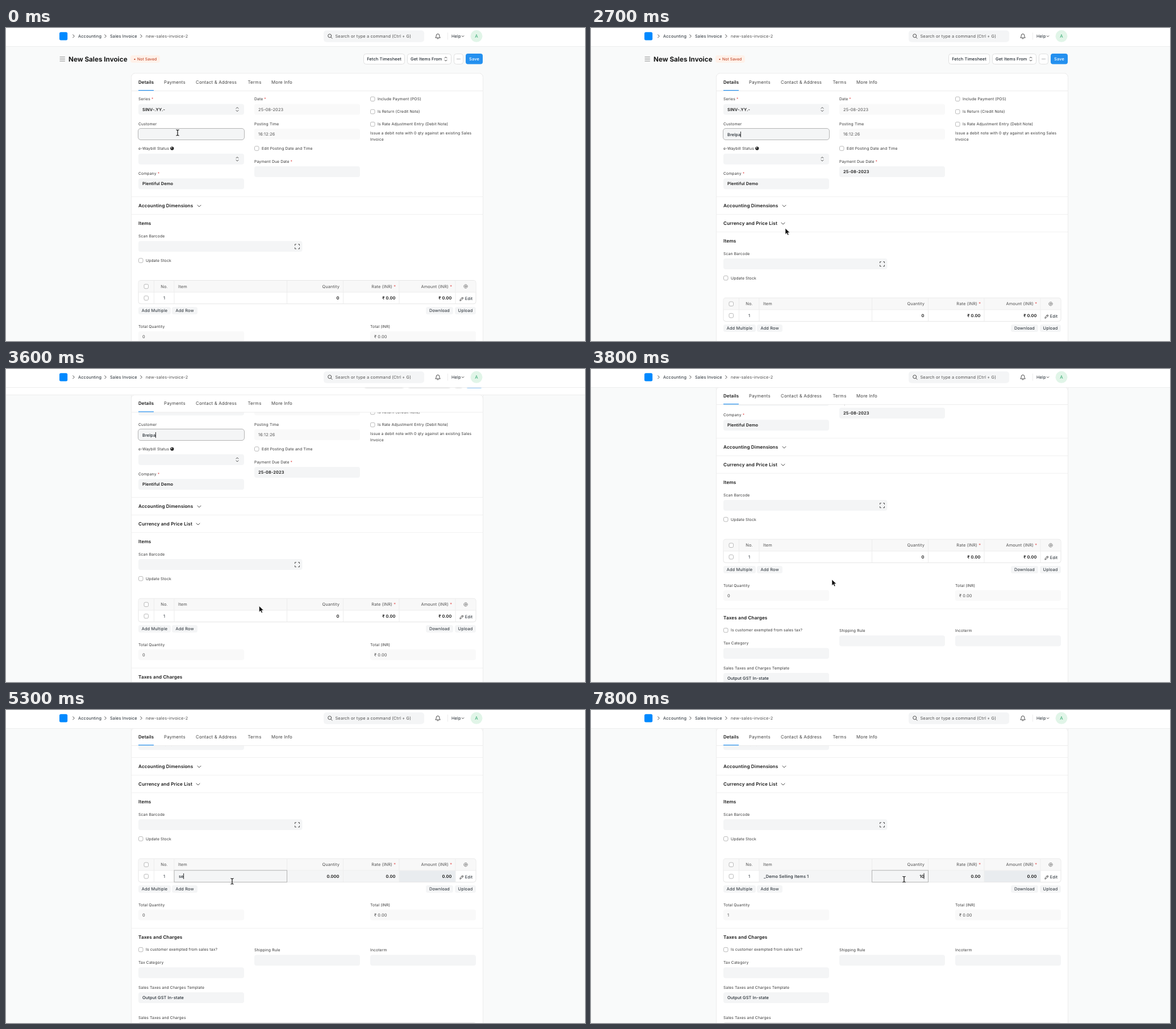
Write an HTML page that moves like this. It is 1019 px wide and 550 px high and loops after 8000 ms.

```html
<!DOCTYPE html>
<html lang="en">
<head>
<meta charset="utf-8">
<title>New Sales Invoice</title>
<style>
  html, body { margin: 0; width: 100%; height: 100%; overflow: hidden; background: #f9fafa; }
  svg { display: block; width: 1019px; height: 550px; }
  text { font: 400 7.37px Inter, sans-serif; letter-spacing: .02em; fill: #1f272e; text-rendering: geometricPrecision; white-space: pre; }
  .small { font-size: 6.78px; fill: #383838; }
  .tab { font-size: 7.87px; fill: #454545; }
  .section { font-size: 8.1px; font-weight: 600; fill: #171717; }
  .title { font-size: 11.7px; font-weight: 700; letter-spacing: 0; fill: #171717; }
  .bold { font-weight: 600; fill: #171717; }
  .medium { font-weight: 500; }
  .muted { fill: #525252; }
  .warn { fill: #b52a09; }
  .light { fill: #fff; }
  .end { text-anchor: end; }
  .mid { text-anchor: middle; }
  .icon { fill: none; stroke: #383838; stroke-width: .9; stroke-linecap: round; stroke-linejoin: round; }
  .soft { stroke: #777; }
  .rule { stroke: #ededed; fill: none; }
  .section-rule { stroke: #f1f1f1; fill: none; }
  .focus { fill: #f4f5f6; stroke: #b4b4b4; }
  .caret { stroke: #111; stroke-width: .9; }
  .panel { fill: #fff; filter: drop-shadow(0 1px 2px #0003); }
</style>
</head>
<body>
<svg id="stage" viewBox="0 0 1019 550" xmlns="http://www.w3.org/2000/svg"></svg>
<script>
const LOOP = 8000;
const COLS = [233, 437, 641];
const INSERT = 30.75; // height of the currency section

const text = (x, y, s, cls = '', id = '') =>
  `<text x="${x}" y="${y}" dy=".36em" class="${cls}" id="${id}">${s}</text>`;
const rect = (x, y, w, h, fill, rx = 0, extra = '') =>
  `<rect x="${x}" y="${y}" width="${w}" height="${h}" rx="${rx}" fill="${fill}" ${extra}/>`;
const path = (d, cls = 'icon', extra = '') => `<path d="${d}" class="${cls}" ${extra}/>`;
const group = (id, ...parts) => `<g id="${id}">${parts.join('')}</g>`;
const star = s => `${s} <tspan fill="#e24c4c">*</tspan>`;
const label = (x, y, s) => text(x, y, s, 'small');
const field = (x, y, s = '', cls = 'bold', w = 186, id = '') =>
  rect(x, y - 9.5, w, 19, cls.includes('muted') ? '#f9f9f9' : '#f4f5f6', 4) + text(x + 7, y, s, cls, id);
const box = (x, y) => rect(x + .5, y - 3.7, 7.5, 7.5, '#fff', 2, 'stroke="#a9a9a9" stroke-width=".8"');
const check = (x, y, s) => box(x, y) + text(x + 13, y, s, 'small');
const updown = (x, y) => path(`M${x - 2} ${y - 1.6}l2-2 2 2m-4 3.2l2 2 2-2`);
const down = (x, y, r = 3) => path(`M${x - r} ${y - r / 2}l${r} ${r} ${r}-${r}`);
const right = (x, y) => path(`M${x - 1.3} ${y - 2.6}l2.6 2.6-2.6 2.6`);
const rule = y => path(`M221 ${y}H839`, 'section-rule');
const chip = (x, y, w, s) => rect(x, y - 6.5, w, 13, '#f4f5f6', 3.5) + text(x + w / 2, y, s, 'mid');
const button = (x, w, s) =>
  rect(x + .5, 45.5, w - 1, 18, '#fff', 4, 'stroke="#e0e0e0"') + text(x + w / 2, 54.5, s, 'mid medium');

const nav = () => group('nav',
  rect(0, 0, 1019, 32, '#fff'), path('M0 32.5H1019', 'rule'),
  rect(94, 7.3, 14.2, 14.2, '#0089ff', 2.5),
  [119, 175, 238].map(x => right(x, 14.3)).join(''),
  text(127, 14.3, 'Accounting'), text(183, 14.3, 'Sales Invoice'), text(246, 14.3, 'new-sales-invoice-2', 'muted'),
  rect(559, 4.3, 177, 20.4, '#f4f5f6', 5),
  path('M572 16.3l2 2M572.7 13.7a3 3 0 1 1-6 0 3 3 0 0 1 6 0'),
  text(579.5, 14.5, 'Search or type a command (Ctrl + G)', 'muted'),
  path('M756 16.8c1.2-1 1.2-2.4 1.2-3.6a2.8 2.8 0 0 1 5.6 0c0 1.2 0 2.6 1.2 3.6zM759 18.5a1.1 1.1 0 0 0 2 0'),
  path('M777.5 8V20.5', 'rule'), text(784, 14.3, 'Help'), down(804, 14.5, 1.8),
  '<circle cx="828" cy="14.3" r="10.5" fill="#e1f5e8"/>',
  text(828, 14.3, '<tspan fill="#30a66d">A</tspan>', 'mid tab'));

const head = () => group('head',
  group('headFill', rect(0, 0, 1019, 76, '#fff'), path('M0 75.5H1019', 'rule')),
  path('M95 51h8.5m-8.5 3.5h8.5m-8.5 3.5h8.5', 'icon soft'),
  text(110, 54.5, 'New Sales Invoice', 'title'),
  rect(219, 48, 52, 13, '#fff1e9', 4), '<circle cx="226.5" cy="55" r="1.1" class="warn"/>',
  text(231, 55, '<tspan class="warn">Not Saved</tspan>', 'small'),
  button(629, 73, 'Fetch Timesheet'), button(706, 78, ''),
  text(712, 54.5, 'Get Items From', 'medium'), updown(774, 54.5), button(788, 17, '···'),
  rect(809, 45, 30, 18.5, '#2490ef', 4), text(824, 54.5, 'Save', 'mid medium light'));

const strip = () => group('strip',
  '<path d="M220.5 110.5V86.5a7 7 0 0 1 7-7H832.5a7 7 0 0 1 7 7V110.5z" fill="#fff" stroke="#ededed"/>',
  text(233, 95, 'Details', 'tab bold'), text(278, 95, 'Payments', 'tab'),
  text(334, 95, 'Contact &amp; Address', 'tab'), text(425.5, 95, 'Terms', 'tab'), text(467, 95, 'More Info', 'tab'),
  rect(233, 109, 27, 1.2, '#2490ef'));

const upper = () => {
  const [a, b, c] = COLS;
  return [
    label(a, 125, star('Series')), field(a, 143, 'SINV-.YY.-'), updown(407, 143),
    label(a, 168.7, 'Customer'),
    rect(232.5, 176.5, 187, 20, '', 4.5, 'class="focus"'), text(240, 187, '', 'medium', 'customer'),
    path('', 'caret', 'id="customerCaret"'),
    label(a, 212, 'e-Waybill Status'),
    '<circle cx="292.3" cy="211.5" r="3.1" fill="#222"/>',
    path('M290.5 210.3l1.5-.8.5 1.3-1 1.2zM293.5 212.5l1-.7', 'light'),
    field(a, 230.3), updown(407, 230.3),
    label(a, 256, star('Company')), field(a, 273.8, 'Plentiful Demo'),
    label(b, 125, star('Date')), field(b, 143, '25-08-2023', 'muted'),
    label(b, 168.7, 'Posting Time'), field(b, 186.5, '16:12:26', 'muted'),
    check(b, 211.5, 'Edit Posting Date and Time'),
    label(b, 234.5, star('Payment Due Date')), field(b, 252.5, '', 'bold', 186, 'due'),
    check(c, 124.7, 'Include Payment (POS)'), check(c, 147, 'Is Return (Credit Note)'),
    check(c, 169, 'Is Rate Adjustment Entry (Debit Note)'),
    label(c, 184.5, 'Issue a debit note with 0 qty against an existing Sales'), label(c, 196, 'Invoice'),
    rule(296.5), text(a, 312.3, 'Accounting Dimensions', 'section'), down(340, 312.7),
    group('currency', rule(327.5), text(a, 343, 'Currency and Price List', 'section'), down(338, 343.5))
  ].join('');
};

const table = () => [
  rect(233, 443.5, 594, 41.2, '#fff', 4, 'stroke="#e6e6e6"'),
  rect(233.5, 444, 593, 20, '#f8f8f8', 3),
  group('editCells', rect(296, 464.5, 396, 20, '#f4f5f6'), rect(692, 464.5, 99, 20, '#e9ecef')),
  path('M233 464.2H827' + [260.5, 296, 494.5, 593.5, 692, 791].map(x => `M${x} 443.5v41.2`).join(''), 'rule'),
  rect(296, 464, 198.5, 20.7, '', 0, 'class="focus" id="itemFocus"'),
  rect(494.5, 464, 99, 20.7, '', 0, 'class="focus" id="qtyFocus"'),
  box(242.5, 454), box(242.5, 474.5),
  text(278.5, 454, 'No.', 'mid muted'), text(303, 454, 'Item', 'muted'), text(587, 454, 'Quantity', 'end muted'),
  text(686, 454, star('Rate (INR)'), 'end muted'), text(785, 454, star('Amount (INR)'), 'end muted'),
  '<g class="icon soft"><circle cx="809" cy="454" r="3.2" stroke-dasharray="1.6 .9"/><circle cx="809" cy="454" r="1.3"/></g>',
  text(278.5, 474.3, '1', 'mid'), text(304, 474.3, '', 'medium', 'item'), path('', 'caret', 'id="itemCaret"'),
  text(586.5, 474.3, '', 'end bold', 'qty'), path('M586 469v10', 'caret', 'id="qtyCaret"'),
  text(685.5, 474.3, '', 'end bold', 'rate'), text(784.5, 474.3, '', 'end bold', 'amount'),
  path('M799 479l.5-2 4-4 1.5 1.5-4 4zM802.3 474.2l1.5 1.5'), text(807.7, 475.8, 'Edit'),
  chip(233, 496.7, 57, 'Add Multiple'), chip(292, 496.7, 45, 'Add Row'),
  chip(739, 496.7, 48, 'Download'), chip(790, 496.7, 37, 'Upload')
].join('');

const lower = () => {
  const [a, b, c] = COLS;
  return group('lower',
    rule(327.5), text(a, 343, 'Items', 'section'),
    label(a, 365.5, 'Scan Barcode'), field(a, 383.7, '', '', 288.5),
    path('M508.5 382v-2h2m4 0h2v2m0 4v2h-2m-4 0h-2v-2'),
    check(a, 408.5, 'Update Stock'), table(),
    label(a, 524.5, 'Total Quantity'), field(a, 542.2, '', 'muted', 186, 'totalQty'),
    label(c, 524.5, 'Total (INR)'), field(c, 542.2, '₹ 0.00', 'muted'),
    rule(565.7), text(a, 581.3, 'Taxes and Charges', 'section'),
    check(a, 603.3, 'Is customer exempted from sales tax?'),
    label(a, 625.7, 'Tax Category'), field(a, 644),
    label(a, 669.5, 'Sales Taxes and Charges Template'), field(a, 687.7, 'Output GST In-state', 'medium'),
    label(a, 723.3, 'Sales Taxes and Charges'), rect(233, 731.5, 594, 30, '#f8f8f8', 4, 'stroke="#e6e6e6"'),
    label(b, 603.7, 'Shipping Rule'), field(b, 622), label(c, 603.7, 'Incoterm'), field(c, 622));
};

const option = (x, y, name, ...lines) =>
  text(x, y, name, 'bold') + lines.map((s, i) => text(x, y + 11.8 * (i + 1), s)).join('');

const customerList = () => group('customerList',
  '<clipPath id="listClip"><rect x="233" y="197" width="185" height="177"/></clipPath>',
  rect(233, 197.2, 182.5, 177, '', 3, 'class="panel"'),
  '<g clip-path="url(#listClip)">', rect(236.5, 200.5, 175, 46.5, '#f0f0f0', 4),
  option(242, 211.7, '_Demo Subscribed Customer', '_Demo Subscribed Customer, All Customer', 'Groups, All Territories'),
  option(242, 261.2, '_Demo Subscribed Instalment Customer', '_Demo Subscribed Instalment Customer, All', 'Customer Groups, All Territories'),
  option(242, 310.7, '_Demo Outland Customer', '_Demo Outland Customer, All Customer Groups,', 'All Territories'),
  option(242, 360.2, 'Demo', 'Demo, All Customer Groups, All Territories'),
  rect(415, 197, 3, 58, '#c1c1c1'), '</g>');

const itemList = () => group('itemList',
  rect(296.5, 303, 197, 178, '', 3, 'class="panel"'), rect(300, 306, 190, 34, '#f0f0f0', 4),
  [1, 2, 3].map(n => option(306, 317 + 37 * (n - 1), `_Demo Selling Items ${n}`, `_Demo Selling Items ${n}, Products`)).join(''));

const pointers =
  path('M0 0V10.5L2.5 8.3 4.2 12 6 11.2 4.4 7.6H7.8Z', '', 'id="arrow" fill="#111" stroke="#fff" stroke-width=".5"') +
  path('M-2.7-5Q-.5-5 0-4 .5-5 2.7-5M0-4V4M-2.7 5Q-.5 5 0 4 .5 5 2.7 5', '', 'id="beam" fill="none" stroke="#111" stroke-width="1.2"');

document.getElementById('stage').innerHTML =
  rect(0, 0, 1019, 550, '#f9fafa') +
  group('content', rect(220.5, 79.5, 619, 900, '#fff', 7, 'stroke="#ededed"'), upper(), lower()) +
  strip() + head() + nav() + customerList() + itemList() + pointers;

// Each track holds [start, value] steps.
const tracks = {
  scroll: [[0, 0], [3500, 18], [3600, 71], [3700, 130], [3800, 175], [3900, 204], [4000, 213]],
  lift: [[0, 0], [3500, 12], [3600, 30], [3700, 40], [3800, 43.5]],
  customer: [[0, ''], [1200, 'b'], [1300, 'br'], [1500, 'bre'], [2400, 'Brelpa']],
  item: [[0, ''], [5200, 's'], [5300, 'se'], [5400, 'sel'], [5500, 'sell'], [6400, '_Demo Selling Items 1']],
  qty: [[0, '0'], [4900, '0.000'], [6600, '1.000'], [7100, ''], [7600, '1'], [7800, '10']],
  totalQty: [[0, '0'], [6600, '1']],
  price: [[0, '₹ 0.00'], [4900, '0.00']],
  due: [[0, ''], [2700, '25-08-2023']],
  pointer: [
    [0, ['beam', 302, 184]], [1400, ['beam', 304, 187]], [1500, ['beam', 305, 188]],
    [1800, ['beam', 305, 195]], [1900, ['arrow', 311, 235]], [2000, ['arrow', 325, 290]],
    [2100, ['arrow', 337, 335]], [2200, ['arrow', 342, 352]],
    [2800, ['arrow', 352, 366]], [2900, ['arrow', 372, 382]], [3000, ['arrow', 396, 400]],
    [3100, ['arrow', 420, 412]], [3200, ['arrow', 438, 418]], [3300, ['arrow', 445.5, 416.5]],
    [3700, ['arrow', 440, 400]], [3800, ['arrow', 424, 370]], [3900, ['arrow', 408, 345]],
    [4000, ['arrow', 400, 331]], [4100, ['arrow', 394, 302]], [4300, ['arrow', 393, 274]],
    [4400, ['arrow', 394, 302]], [4700, ['beam', 398, 301]],
    [5400, ['beam', 398, 308]], [5600, ['arrow', 394, 318]], [5700, ['arrow', 394, 324]],
    [5900, ['arrow', 402, 324]], [6100, ['arrow', 411.5, 322]], [6500, ['arrow', 440, 316]],
    [6600, ['arrow', 490, 306]], [6700, ['arrow', 535, 297]], [6800, ['beam', 551, 297.5]]
  ]
};

const el = id => document.getElementById(id);
const at = (name, t) => tracks[name].findLast(([start]) => start <= t)[1];
const show = (id, on) => { el(id).style.display = on ? '' : 'none'; };
const move = (id, x, y) => el(id).setAttribute('transform', `translate(${x} ${y})`);
const write = (id, s) => { if (el(id).textContent !== s) el(id).textContent = s; };

function placeCaret(id, x, y) {
  const end = x + (el(id).textContent ? el(id).getComputedTextLength() : 0);
  el(id + 'Caret').setAttribute('d', `M${end} ${y - 5}v10`);
}

function draw(t) {
  const scroll = at('scroll', t), lift = at('lift', t);
  move('content', 0, -scroll);
  move('lower', 0, t >= 2700 ? INSERT : 0);
  move('head', 0, -lift);
  move('strip', 0, Math.max(-scroll, scroll ? -4.5 - lift : 0));
  show('headFill', scroll > 0);
  show('currency', t >= 2700);

  for (const id of ['customer', 'item', 'qty', 'totalQty', 'due']) write(id, at(id, t));
  write('rate', at('price', t));
  write('amount', at('price', t));
  placeCaret('customer', 240, 187);
  placeCaret('item', 304, 474.3);

  show('customerCaret', t >= 600 && t < 4900);
  show('customerList', t >= 400 && t < 2400);
  show('editCells', t >= 4900);
  show('itemFocus', t >= 4900 && t < 7000);
  show('itemCaret', t >= 4900 && t < 7000);
  show('itemList', t >= 5900 && t < 6400);
  show('qtyFocus', t >= 7000);
  show('qtyCaret', t >= 7600);

  const [kind, x, y] = at('pointer', t);
  show('arrow', kind === 'arrow');
  show('beam', kind === 'beam');
  move(kind, x, y);
}

const start = performance.now();
function tick() {
  draw((performance.now() - start) % LOOP);
  requestAnimationFrame(tick);
}
tick();
</script>
</body>
</html>
```
